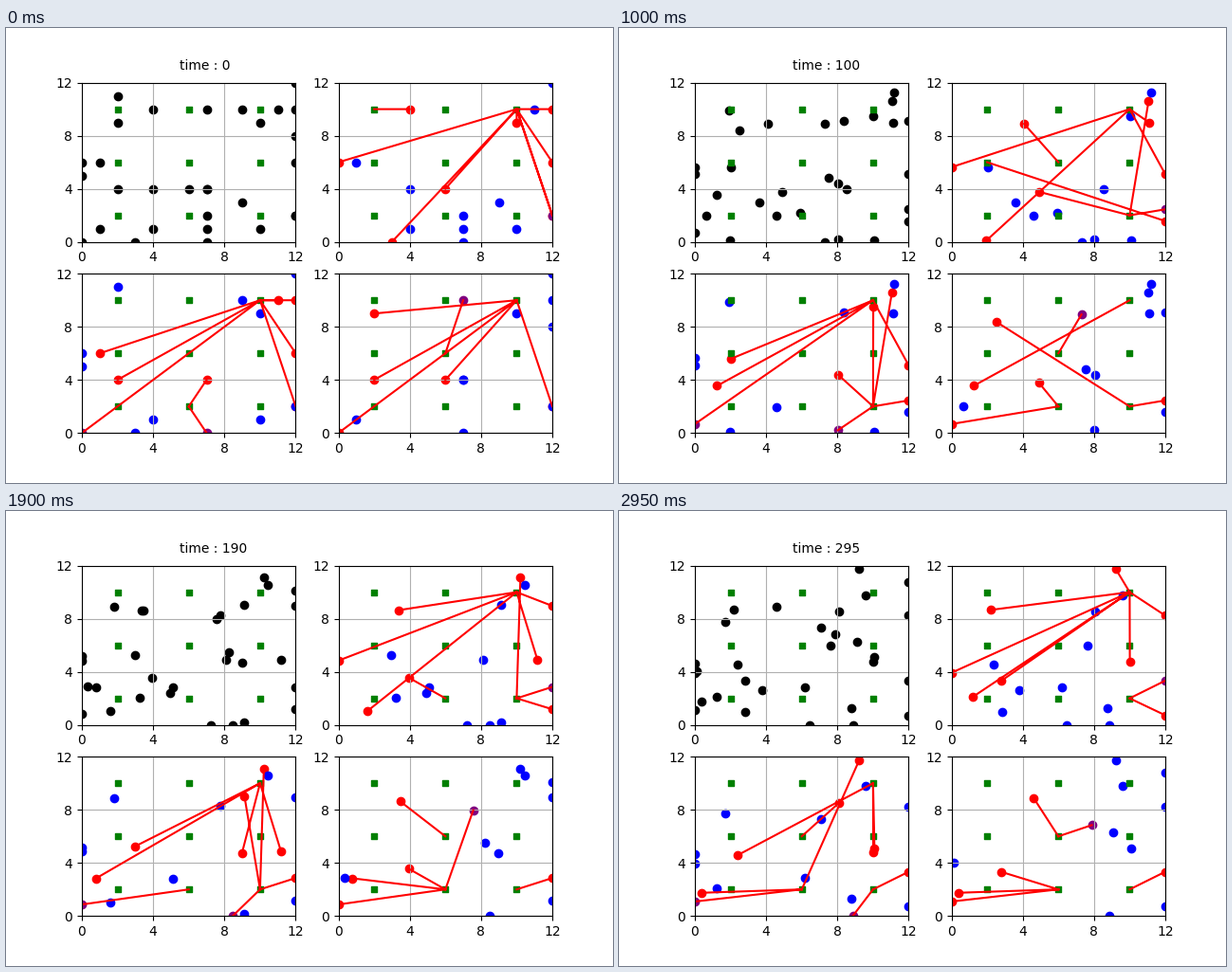
A matplotlib script for the animation above (3000 ms loop, 640 by 480 pixels).

```python
from math import cos, radians, sin

import numpy as np
import matplotlib.pyplot as plt
from matplotlib.animation import FuncAnimation

FRAMES, INTERVAL, STEP = 60, 50, 5
SIZE, SPEED = 12, 0.0111

ROWS, COLS = {"S": 2, "": 6, "N": 10}, {"W": 2, "": 6, "E": 10}
SERVERS = {row + col or "C": (x, y)
           for row, y in ROWS.items() for col, x in COLS.items()}

# Start cell, heading in degrees, then (turn time, new heading) pairs
WALKERS = {
    "N1": (2, 11, 265),
    "N2": (2, 9, 280, 65, 14),
    "N3": (4, 10, 274, 124, 179),
    "N4": (7, 10, 285.5),
    "N5": (9, 10, 234.5),
    "N6": (11, 10, 207),
    "N7": (12, 12, 222.5),
    "N8": (12, 10, 148),
    "N9": (10, 9, 359, 230, 270),
    "N10": (12, 8, 90, 240, 10),
    "M1": (12, 6, 305, 115, 185),
    "M2": (9, 3, 115),
    "M3": (7, 4, 20),
    "M4": (7, 4, 120, 22, 43),
    "M5": (6, 4, 192),
    "M6": (2, 4, 239, 62, 160, 115, 249),
    "M7": (4, 4, 249),
    "M8": (0, 6, 156, 38, 232),
    "M9": (0, 5, 175, 235, 245),
    "M10": (1, 6, 338.5, 190, 263, 250, 180),
    "S1": (1, 1, 98, 75, 146, 118, 101),
    "S2": (4, 1, 58.5, 205, 355),
    "S3": (7, 2, 169),
    "S4": (7, 1, 286, 165, 190, 235, 245),
    "S5": (7, 0, 24, 70, 340, 115, 290),
    "S6": (10, 1, 284, 85, 179, 183, 107),
    "S7": (12, 2, 24),
    "S8": (12, 2, 337),
    "S9": (0, 0, 82, 52, 169),
    "S10": (3, 0, 180, 92, 110),
}

# Per panel: linked walkers with "server server@time", the purple ones, the idle ones
PANELS = [
    ({"N3": "NW C@10 NE@160", "N8": "NE SE@100 NE@215", "N9": "NE", "M1": "NE",
      "M5": "NE SE@10 S@160 NE@215", "M8": "NE", "S10": "NE",
      "S8": "NE W@100 SE@160", "S7": "NE SE@50"},
     {"S7"}, "M10 M7 S2 S3 S4 S5 M2 S6 N6 N7"),
    ({"N6": "NE SE@100 C@265", "N8": "NE SE@100 S@265", "M1": "NE",
      "M3": "S SE@100 NE@160", "M6": "NE S@215", "M10": "NE",
      "S7": "NE SE@100", "S5": "S SE@100", "S9": "NE S@160"},
     {"S5", "S9"}, "M8 M9 N1 S10 S2 N5 N9 S6 N7 S8"),
    ({"N2": "NE SE@100 C@160", "M5": "NE S@10", "M6": "NE S@160",
      "S7": "NE SE@100", "S9": "NE S@100", "N4": "C S@160 C@265"},
     {"N4"}, "S1 M3 M4 S5 N9 N7 N8 N10 S8"),
]


def position(name, t):
    """Walk each leg at constant speed; the walls stop any outward motion."""
    x, y, *legs = WALKERS[name]
    starts, headings = [0] + legs[1::2], legs[::2]
    for start, end, heading in zip(starts, starts[1:] + [np.inf], headings):
        dist = SPEED * max(0, min(t, end) - start)
        x = min(max(x + dist * cos(radians(heading)), 0), SIZE)
        y = min(max(y + dist * sin(radians(heading)), 0), SIZE)
    return x, y


def server_at(plan, t):
    for item in plan.split():
        name, _, start = item.partition("@")
        if t >= int(start or 0):
            current = name
    return SERVERS[current]


def dots(ax, names, color):
    return ax.scatter([], [], color=color), list(names)


fig, axes = plt.subplots(2, 2, figsize=(6.4, 4.8), dpi=100)
groups, link_sets = [], []

for i, ax in enumerate(axes.flat):
    ticks = range(0, SIZE + 1, 4)
    ax.set(xlim=(0, SIZE), ylim=(0, SIZE), xticks=ticks, yticks=ticks)
    ax.grid(True)
    if i == 0:
        groups.append(dots(ax, WALKERS, "black"))
    else:
        plans, relays, idle = PANELS[i - 1]
        groups.append(dots(ax, [n for n in plans if n not in relays], "red"))
        groups.append(dots(ax, relays, "purple"))
        groups.append(dots(ax, idle.split(), "blue"))
        link_sets.append((ax.plot([], [], color="red")[0], plans))
    ax.scatter(*zip(*SERVERS.values()), s=16, marker="s", color="green")

clock = axes[0, 0].text(5.5, 13, "")


def update(frame):
    t = frame * STEP
    clock.set_text(f"time : {t}")
    for scatter, names in groups:
        scatter.set_offsets([position(n, t) for n in names])
    for line, plans in link_sets:
        pts = []
        for name, plan in plans.items():
            pts += [position(name, t), server_at(plan, t), (np.nan, np.nan)]
        line.set_data(*zip(*pts))


anim = FuncAnimation(fig, update, frames=FRAMES, interval=INTERVAL,
                     init_func=lambda: update(0), repeat=True, repeat_delay=0)
plt.show()
```
